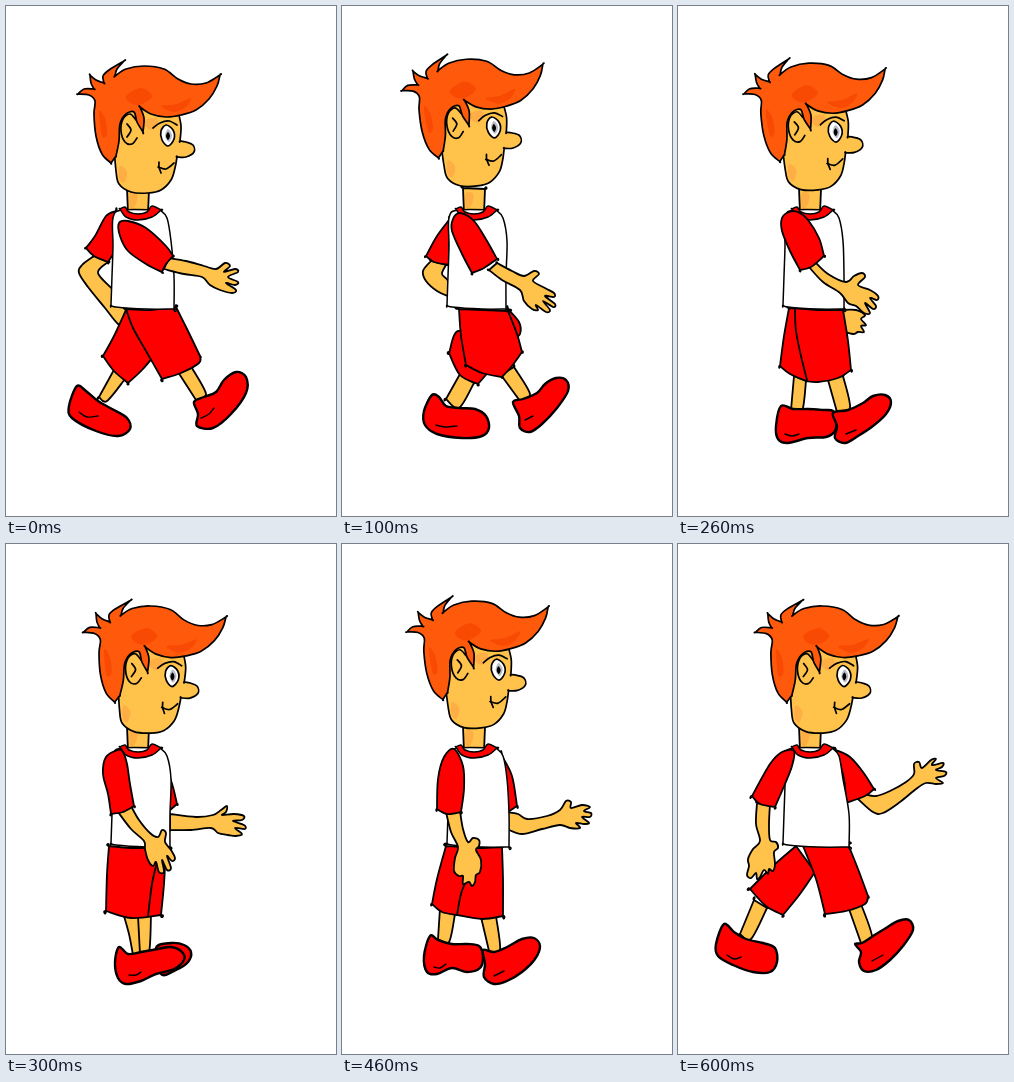
An HTML page with a canvas for the animation above (700 ms loop, 330 by 510 pixels).

```html
<!DOCTYPE html>
<html lang="en">
<head>
<meta charset="utf-8">
<title>Walking boy</title>
<style>
  html, body { margin: 0; width: 100%; height: 100%; overflow: hidden; background: #fff; }
  canvas { display: block; }
</style>
</head>
<body>
<canvas id="stage" width="330" height="510"></canvas>
<script>
const ctx = document.getElementById('stage').getContext('2d');
const STEP = 100;

// Part notation: a colour key, then points on a smooth curve; "!" marks a corner.
const OUTLINED = { r: '#ff0000', s: '#ffc24b', w: '#ffffff', o: '#ff5a0c' };
const FLAT = { t: '#ffae45', d: '#f94a04', g: '#b9bcc4', b: '#000000' };

const head = [
  's108,140! 110,165 113,178 125,186 142,187 155,184 165,174 169,162 171,151! 180,151 188,146 187,139 180,136 174,135! 175,120 172,105! 130,95! 115,110!',
  't140,114 150,112 152,118 146,124 140,121',
  't114,160 121,166 118,177 113,172',
  'o105,157! 96,148 90,130 88,108 89,95 83,89 72,88! 78,83 88,83! 85,77 84,69! 90,74 98,77! 97,70 103,64 118,55! 111,63 109,70! 120,63 138,60 158,63 172,73 185,78 200,77 214,69! 211,80 203,93 190,104 175,109 160,111 145,108 134,101! 138,112 137,126! 131,116 128,106 120,108 114,118 113,135 110,150!',
  'd120,90 135,82 146,90 136,98 126,98',
  'd155,100 170,98 185,92 180,101 168,106',
  'd93,105 99,112 101,128 96,130',
  'k130,114 124,108 117,113 115,125 119,136 126,138 131,132',
  'k121,118 125,124 121,131',
  'w160,119 167,124 168,133 162,140 156,134 155,125',
  'g162,123 166,129 163,136 159,130',
  'b162,126 164,130 162,134 160,130',
  'k147,122 154,117 163,115 171,119',
  'k152,161 160,163 168,157',
  'k153,156 153,161 155,167'
];
const neck = ['s121,182! 122,208! 132,211 142,208! 143,183!', 't124,187 131,188 130,198 124,203'];
const collar = 'r114,203! 119,201 123,206 132,208 141,206 146,200 155,204! 146,211 132,214 120,211';
const shirt = hem => `w116,204 107,212 107,240 106,270 105,299! 110,301 140,303 ${hem},303! ${hem},270 165,235 161,212 154,204!`;

// head: x, y, degrees of turn about the chin
const poses = [
  { head: [0, 0, 0], hem: 168,
    farArm: [
      's88,250! 76,259 73,267 82,281 99,302 112,318 119,319 122,313 118,300 108,285 92,267 102,256!',
      'r110,205! 100,210 89,230 80,242! 88,250 102,256! 110,240'],
    legs: ['s109,362! 93,391! 101,395 119,373!', 's172,366! 190,394! 200,388 186,362!'],
    shoes: [
      'r71,380 80,385 92,395 106,403 121,412 124,423 112,430 90,425 66,412 63,400',
      'r188,396 198,391 210,386 218,374 230,366 240,371 240,387 225,408 207,422 191,420 192,408'],
    creases: ['k73,406 81,411 92,410', 'k195,412 203,408 208,402'],
    shorts: [
      'r120,304! 108,330 97,350! 108,365 122,377! 136,364 152,345! 130,315',
      'r120,303! 145,304 170,301! 182,325 194,350! 193,357 175,367 156,373! 140,345 127,322'],
    nearArm: [
      's163,252! 180,255 198,260 210,263 219,257 224,260 218,266 229,263 232,266 222,271 232,276 229,279 220,277 230,284 226,287 214,284 204,279 196,271 178,268 158,263!',
      'r113,217 122,215 140,222 160,240 167,250! 160,258 156,266! 140,258 122,245 114,230'] },

  { head: [-7, -7, -3], hem: 164,
    farArm: [
      's89,255! 81,265 84,275 95,285 108,291! 106,275 100,268 104,259!',
      'r107,214! 95,230 84,250! 92,256 107,259!'],
    legs: ['s118,368! 104,393! 117,402 132,377!', 's159,369! 178,395! 188,388 172,361!'],
    shoes: [
      'r90,389 97,391 104,400 118,402 133,403 144,410 147,422 140,430 120,432 95,428 83,419 82,405',
      'r171,396 181,393 195,387 203,378 214,372 224,374 226,385 215,402 200,418 188,426 178,422 177,410'],
    creases: ['k94,419 103,421 115,420', 'k183,414 191,410'],
    shorts: [
      'r166,303! 177,316 178,328 170,335!',
      'r118,325 107,347! 118,369 136,378! 150,362!',
      'r117,303! 166,305! 175,328 180,346! 170,360 160,371! 140,367 124,359! 119,330'],
    nearArm: [
      's155,257! 170,265 182,270 192,265 197,268 191,275 203,282 212,287 212,291 203,290 213,298 211,301 201,295 208,304 204,306 194,299 196,304 190,303 182,295 178,284 160,274 147,264!',
      'r118,207 111,213 110,225 120,248 130,267! 142,262 155,253! 145,235 132,215'] },

  { head: [-2, -3, -2.4], hem: 166,
    farArm: ['s163,304! 178,304 187,309 183,313 188,319 183,320 186,326 180,326 175,328 164,325!'],
    legs: ['s116,370! 113,404! 124,405 128,375!', 's150,374! 159,406! 172,402 165,370!'],
    shoes: [
      'r103,400 115,403 130,403 145,404 155,405 158,415 157,425 148,431 130,432 110,437 100,433 98,420',
      'r155,407 170,404 185,397 195,390 207,389 213,396 208,408 195,420 180,430 167,437 157,432 159,420'],
    creases: ['k107,428 114,430 121,428', 'k168,428 178,424'],
    shorts: [
      'r111,302! 140,304 165,304! 170,335 173,364! 160,372 140,376 128,375! 112,368 102,360! 106,330',
      'k117,304 118,325 123,350 129,374'],
    nearArm: [
      's137,256! 150,268 168,276 176,270 184,267 187,271 180,279 192,284 200,290 199,294 192,292 198,300 195,303 187,297 192,307 186,307 178,300 170,297 162,287 145,276 131,261!',
      'r111,206 104,212 104,225 112,245 122,264! 133,261 146,250! 141,232 130,214 120,206'] },

  { head: [3, 2, 1.5], hem: 164,
    farArm: [
      's164,270! 190,273 207,271 215,266 221,262 220,268 216,271 228,270 238,272 236,276 227,277 238,281 239,285 229,284 236,290 230,292 222,291 212,289 205,284 185,286 164,286!',
      'r162,228! 167,243 171,260! 163,267!'],
    legs: ['s118,372! 123,390 127,411! 135,411 133,372!', 's132,372! 134,410! 143,408 145,371!'],
    shoes: [
      'r150,404 165,399 178,401 185,408 182,418 170,426 155,430',
      'r113,403 122,410 135,408 152,405 165,403 176,408 178,416 168,425 150,430 135,437 120,440 112,434 109,418'],
    creases: ['k123,431 130,431 135,428'],
    shorts: [
      'r103,302! 130,304 160,302! 158,340 155,371! 125,374 100,367! 101,330',
      'k151,318 146,340 142,372'],
    nearArm: [
      's125,262! 133,276 144,289 152,293 156,286 160,289 159,298 165,306 169,314 166,317 161,312 165,324 161,326 156,316 158,328 153,328 150,318 147,322 142,316 139,305 138,297 125,285 112,268!',
      'r112,206 100,213 97,230 102,250 105,270! 117,268 128,262! 124,240 121,220 117,208'] },

  { head: [-3, -3, -2.4], hem: 167,
    farArm: [
      's165,268! 176,270 185,275 205,272 218,266 224,257 229,258 229,264 240,261 248,263 242,267 249,269 248,273 240,273 247,279 242,280 234,279 238,284 228,284 218,281 200,285 180,290 165,285!',
      'r160,212! 170,232 175,262! 166,268!'],
    legs: ['s98,364! 96,395! 107,398 113,370!', 's139,373! 147,407! 158,406 154,372!'],
    shoes: [
      'r88,392 96,396 110,400 125,400 137,402 141,412 138,424 125,428 110,424 95,430 85,428 82,412',
      'r141,406 152,408 165,403 180,395 192,394 198,402 193,415 180,428 165,437 152,440 142,433 143,420'],
    creases: ['k92,423 98,424 104,420', 'k152,432 162,427'],
    shorts: [
      'r104,302! 135,304 160,303! 161,335 161,372! 140,375 115,371! 100,368 90,360! 95,335',
      'k125,335 119,350 115,371'],
    nearArm: [
      's118,267! 121,285 126,298 131,294 137,296 137,302 134,306 139,316 138,328 134,331 133,338 130,342 127,338 121,340 121,332 117,332 112,327 113,314 116,303 109,288 104,268!',
      'r112,205 102,213 96,235 95,265! 105,270 119,268! 122,245 121,222'] },

  { head: [0, 0, 0], hem: 166,
    farArm: [
      's178,258! 190,270 205,270 220,262 230,253 230,240 233,235 238,234 240,240 250,234 256,235 253,240 262,239 262,243 256,246 262,250 256,253 250,254 252,258 244,259 235,261 220,270 200,279 188,277 172,262!',
      'r160,211! 172,222 182,237 189,250! 180,258 167,265! 164,240'],
    legs: ['s85,364! 76,395! 87,400 99,372!', 's150,371! 160,407! 171,404 164,369!'],
    shoes: [
      'r65,391 75,397 88,401 105,403 118,409 121,420 115,430 95,432 75,429 60,424 57,410',
      'r157,405 165,408 175,402 188,394 200,388 212,388 214,396 206,410 192,424 177,434 166,435 159,428 161,415'],
    creases: ['k67,419 74,422 81,421', 'k172,428 182,422'],
    shorts: [
      'r105,302! 87,320 76,355! 92,370 110,377! 119,362 128,335!',
      'r117,303! 166,303! 171,325 176,348! 172,360 166,369! 145,373 130,373! 123,345'],
    nearArm: [
      's106,264! 107,285 112,300 117,305 119,318 118,327 115,320 113,325 113,336 109,341 106,336 102,342 99,337 97,330 92,328 94,315 99,302 94,283 93,264!',
      'r117,207 106,210 95,230 84,258! 95,265 108,266! 115,245 117,225'] },

  { head: [3, 2, 1.4], hem: 171,
    farArm: [
      's186,250! 198,252 212,247 228,238 236,230 236,220 241,218 244,224 253,216 258,215 254,221 265,219 264,223 258,226 268,228 266,232 258,234 265,239 258,240 248,239 238,245 222,258 205,269 195,268 180,255!',
      'r158,206! 172,213 185,228 196,245! 187,252 168,259! 166,235'],
    legs: ['s76,356! 62,390! 73,395 89,364!', 's171,365! 183,399! 194,393 183,360!'],
    shoes: [
      'r46,380 56,388 68,395 85,399 97,404 99,418 92,428 75,428 55,421 40,412 38,400',
      'r177,400 184,399 195,392 208,384 220,377 231,376 235,386 225,402 212,416 198,426 186,427 181,418 183,408'],
    creases: ['k49,411 56,415 63,413', 'k194,417 205,411'],
    shorts: [
      'r118,302! 95,322 72,345! 88,362 105,371! 122,350 137,328!',
      'r125,302! 170,300! 180,325 190,352! 187,360 168,367 147,370! 138,335'],
    nearArm: [
      's92,260! 91,280 92,296 98,298 100,304 96,308 97,320 95,327 91,325 90,330 86,326 82,333 79,335 78,329 73,334 69,331 71,322 70,315 75,305 82,297 78,280 79,259!',
      'r116,207 104,208 92,220 74,252! 82,260 97,263! 107,240 114,222'] }
];

// Catmull-Rom curve through the points of a part
function trace(points, closed) {
  const n = points.length;
  const at = i => closed ? points[(i + n) % n] : points[Math.max(0, Math.min(n - 1, i))];
  ctx.beginPath();
  ctx.moveTo(...points[0]);
  for (let i = 0; i < (closed ? n : n - 1); i++) {
    const [a, b, c, d] = [at(i - 1), at(i), at(i + 1), at(i + 2)];
    ctx.bezierCurveTo(
      b[0] + (c[0] - a[0]) / 6, b[1] + (c[1] - a[1]) / 6,
      c[0] - (d[0] - b[0]) / 6, c[1] - (d[1] - b[1]) / 6, ...c);
  }
  if (closed) ctx.closePath();
}

function draw(parts, width = 1.8) {
  for (const part of [].concat(parts)) {
    const key = part[0];
    const points = part.slice(1).split(' ').flatMap(s => {
      const p = s.split(',').map(parseFloat);
      return s.endsWith('!') ? [p, p] : [p];
    });
    trace(points, key !== 'k');
    ctx.lineWidth = width;
    if (key !== 'k') {
      ctx.fillStyle = OUTLINED[key] || FLAT[key];
      ctx.fill();
    }
    if (!FLAT[key]) ctx.stroke();
  }
}

function render(pose) {
  ctx.fillStyle = '#fff';
  ctx.fillRect(0, 0, 330, 510);
  draw(pose.farArm);
  draw(pose.legs);
  draw(pose.shoes, 2.4);
  draw(pose.creases, 1.4);
  draw(pose.shorts);
  draw(neck);
  draw(shirt(pose.hem), 1.5);
  draw(collar, 1.5);
  draw(pose.nearArm);
  const [x, y, turn] = pose.head;
  ctx.save();
  ctx.translate(140 + x, 185 + y);
  ctx.rotate(turn * Math.PI / 180);
  ctx.translate(-140, -185);
  draw(head, 1.7);
  ctx.restore();
}

ctx.lineJoin = ctx.lineCap = 'round';
const start = performance.now();
function tick() {
  const time = performance.now() - start;
  render(poses[Math.floor(time / STEP) % poses.length]);
  requestAnimationFrame(tick);
}
tick();
</script>
</body>
</html>
```
